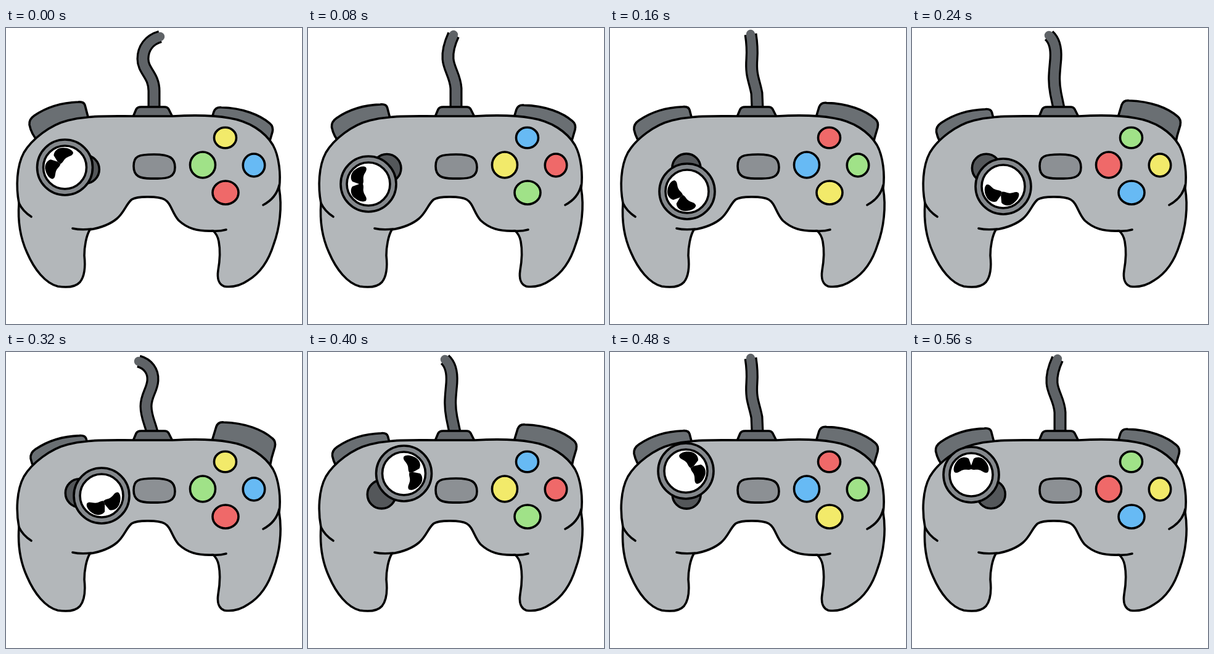
Write an HTML page that moves like this. It is 480 px wide and 480 px high and loops after 640 ms.

```html
<!DOCTYPE html>
<html lang="en">
<head>
<meta charset="utf-8">
<title>Game controller</title>
<style>
  html, body { margin: 0; width: 100%; height: 100%; overflow: hidden; background: #fff; }
  svg { display: block; width: 100%; height: 100%; }
  .ink { stroke: #000; stroke-width: 3.6; stroke-linecap: round; stroke-linejoin: round; }
  .line { fill: none; }
</style>
</head>
<body>
<svg viewBox="0 0 480 480">
  <path id="cableEdge" class="line" stroke="#000" stroke-width="21"/>
  <path id="cable" class="line" stroke="#5f6367" stroke-width="14.5" stroke-linecap="round"/>
  <path class="ink" fill="#65696d" d="M206 144L211 132Q213 128 219 128L257 128Q262 128 264 132L270 144Z"/>

  <path id="leftTrigger" class="ink" fill="#6a6f73"
    d="M52 184Q41 172 38 157Q37 148 46 142C65 129 90 121 117 120Q126 119 128 125L134 148L134 200L60 200Z"/>
  <path id="rightTrigger" class="ink" fill="#6a6f73"
    d="M334 144L341 121Q344 113 353 114C388 115 416 126 432 140Q438 145 436 154L431 171L425 200L334 200Z"/>

  <path class="ink" fill="#b3b7ba" d="M130 145C150 142 180 143 210 143L270 143C305 141 340 142 362 146
    C394 151 420 168 433 190C443 208 446 238 443 260C448 290 444 324 434 351C425 380 411 398 393 409
    C380 418 368 421 354 419C345 416 342 406 344 393C347 376 348 362 345 346Q343 335 336 329
    C310 330 294 325 280 312C269 300 268 284 257 278C248 273 214 272 204 278C195 285 192 299 180 309
    C168 319 154 324 136 327C130 337 127 355 127 369C129 387 128 402 120 412
    C112 421 97 421 84 419C64 414 46 392 34 364C23 340 19 312 21 284C16 258 17 224 29 202
    C42 180 72 157 100 150Q115 146 130 145Z"/>
  <path class="ink line" d="M108 325Q121 328 138 326M334 329Q346 330 357 327
    M21 284Q27 297 41 306M443 255Q438 276 417 287"/>

  <path class="ink" fill="#8c9094" d="M207 224C207 208 214 205 240 205C266 205 274 211 274 226C274 241 264 245 240 244C216 245 207 240 207 224Z"/>
  <g id="buttons" class="ink"></g>

  <circle id="base" class="ink" fill="#54575a" r="23"/>
  <g id="head">
    <circle class="ink" r="45" fill="#84888c"/>
    <circle class="ink" r="35" fill="#fff"/>
    <g id="eyes"></g>
  </g>
</svg>
<script>
const STEP = 80, STEPS = 8;
const $ = id => document.getElementById(id);
const move = (id, x, y) => $(id).setAttribute('transform', `translate(${x} ${y})`);

const colors = ['#f2ea6a', '#67baf4', '#ef6969', '#a0e288'];
// top, right, bottom, left: cx, cy, rx, ry
const spots = [[355.5, 178, 18, 16.7], [402, 222.5, 17.7, 18.5], [356, 267, 21, 19], [319, 222, 20.5, 21]];

// stick head: x, y, rotation of the face
const poses = [
  [95.5, 226, -52], [98, 253, -90], [125, 265, -130], [148, 257, -165],
  [155, 233, -200], [155.5, 197, -279], [123, 193, -302], [96, 199, 0]
];

// cable from leaning right to leaning left
const cables = [
  'M250 14C232 19 222 33 222 50C222 70 240 76 240 102L240 130',
  'M236 11C230 24 226 36 227 50C228 66 239 78 240 98L240 130',
  'M228 10C230 23 231 36 230 50C228 78 234 84 238 106L239 130',
  'M222 12C232 21 234 35 233 50C231 74 229 84 233 106L238 130',
  'M215 15C230 19 239 31 238 46C237 62 227 70 227 88C227 104 233 114 237 130'
];

const eye = 'M0 -15L-4 -26C-9 -30 -18 -29 -23 -22C-28 -16 -30 -8 -27 -4C-22 -1 -18 -7 -12 -8C-8 -9 -5 -7 0 -9Z';
$('eyes').innerHTML = `<path d="${eye}"/><path d="${eye}" transform="scale(-1 1)"/>`;
$('buttons').innerHTML = spots.map(([x, y, rx, ry]) =>
  `<ellipse cx="${x}" cy="${y}" rx="${rx}" ry="${ry}"/>`).join('');
const buttons = [...$('buttons').children];

function draw(time) {
  const k = Math.floor(time / STEP) % STEPS;
  const lean = Math.min(k, STEPS - k);

  $('cableEdge').setAttribute('d', cables[lean]);
  $('cable').setAttribute('d', cables[lean]);
  move('leftTrigger', lean * 0.5, lean * 3.9);
  move('rightTrigger', lean - 4, (4 - lean) * 3.7);
  buttons.forEach((b, i) => b.setAttribute('fill', colors[(i + k) % 4]));

  const [x, y, turn] = poses[k];
  move('base', 124 - (x - 124) * 0.15, 229 - (y - 229) * 0.06);
  move('head', x, y);
  $('eyes').setAttribute('transform', `rotate(${turn})`);
}

const start = performance.now();
function tick() {
  draw(performance.now() - start);
  requestAnimationFrame(tick);
}
tick();
</script>
</body>
</html>
```
